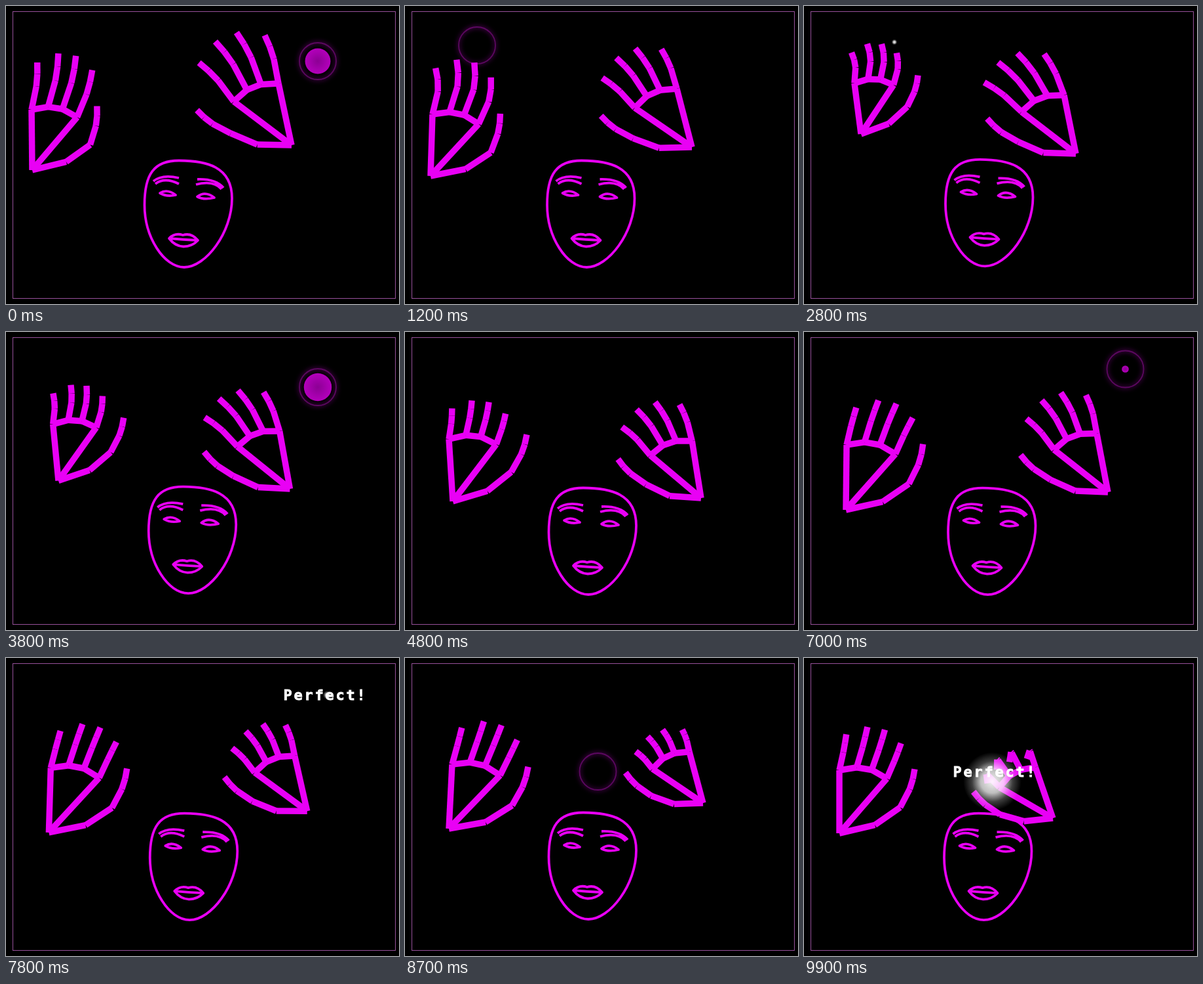
Write an HTML page with a canvas that moves like this. It is 600x454 px and loops after 10000 ms.

```html
<!DOCTYPE html>
<html lang="en">
<head>
<meta charset="utf-8">
<title>Hand rhythm game</title>
<style>
  html, body { margin: 0; width: 100%; height: 100%; overflow: hidden; background: #000; }
  canvas { display: block; }
</style>
</head>
<body>
<canvas id="stage" width="600" height="454"></canvas>
<script>
const ctx = document.getElementById('stage').getContext('2d');
const LOOP = 10000, STEP = 100;
const PINK = '#e900f5';
const TIMES = [0, 1200, 2800, 4800, 7000, 8700, 9900];

// Pose: wrist x, y, palm length, palm tilt, finger reach, finger lean (degrees, towards the thumb)
const left = {
  side: 1, splay: 11, thumbSize: 1,
  thumb: reach => 55 - .6 * reach,
  bend: lean => .1 - .008 * lean,
  poses: [
    [40, 250, 92, -.6, 74, 7.5],
    [39, 259, 94, 1.8, 72, 2],
    [87, 195, 78, -7.4, 48, 2],
    [73, 258, 95, -3.6, 48, 9.5],
    [64, 271, 99, .6, 60, 14],
    [67, 260, 98, 2.9, 59, 12],
    [54, 267, 96, 0, 57, 11]
  ]
};
const right = {
  side: -1, splay: 26, thumbSize: .94,
  thumb: reach => 24 + .25 * reach,
  bend: () => -.045,
  poses: [
    [436, 212, 96, 12, 78, 4],
    [438, 215, 92, 14.5, 66, 7],
    [415, 225, 91, 11.4, 71, 14.5],
    [452, 253, 88, 9, 60, 10],
    [464, 244, 91, 10.8, 62, 5],
    [455, 221, 81, 15, 36, 3],
    [380, 244, 82, 19, 26, 2]
  ]
};
const headShift = [[0, 0], [5.5, 0], [4.5, -1.6], [8, 2], [8.5, 2.2], [8, 0], [2.5, 1.2]];

const face = new Path2D(`
  M264 235.5 C305 235.5 345 244 345 293 C345 345 305 398 272 398
  C241 398 211.5 352 211.5 303 C211.5 256 226 235.5 264 235.5 Z
  M225 267 Q238 256 264 262 M228 271 Q242 260 264 271
  M292 264 Q320 263 332 277 M290 272 Q317 265 329 279
  M235 285 Q246 278 259 288 Q245 291 235 285 Z
  M292 290.5 Q304 281 318 292 Q302 296 292 290.5 Z
  M249 354 Q258 345 270 349 Q283 345 293 357 Q284 366.5 271 366.5 Q258 366 249 354 Z
  M249 354 Q270 356 293 357`);

// Circles to hit, one every GAP; dx, dy move the flash to the hand
const FIRST = -690, GAP = 1870, HIT = 980, FLASH_END = 1640;
const spot = (x, y, dx = 0, dy = 0) => ({ x, y, dx, dy });
const targets = [
  spot(476, 84), spot(110, 60, 28, -5), spot(476, 84),
  spot(110, 60), spot(490.5, 56.5), spot(294.5, 173, -7, 15)
];

const clamp = v => Math.max(0, Math.min(1, v));

function sample(poses, t) {
  let i = 0;
  while (i < TIMES.length - 2 && TIMES[i + 1] <= t) i++;
  const k = clamp((t - TIMES[i]) / (TIMES[i + 1] - TIMES[i]));
  return poses[i].map((v, j) => v + (poses[i + 1][j] - v) * k);
}

function disc(x, y, r, fill) {
  ctx.fillStyle = fill;
  ctx.beginPath();
  ctx.arc(x, y, r, 0, Math.PI * 2);
  ctx.fill();
}

function bones(points) {
  for (let i = 1; i < points.length; i++) {
    ctx.beginPath();
    ctx.moveTo(...points[i - 1]);
    ctx.lineTo(...points[i]);
    ctx.stroke();
  }
}

// Joints from a to b, bowed sideways; curl folds the tip back
function finger([ax, ay], [bx, by], bend, curl) {
  const dx = bx - ax, dy = by - ay;
  const at = (along, off) => [ax + dx * along - dy * off, ay + dy * along + dx * off];
  bones([
    [ax, ay],
    at(.5 + .5 * curl, bend),
    at(.76 + .3 * curl, bend * .75),
    at(1 - .35 * curl, -.3 * curl)
  ]);
}

function drawHand(hand, t) {
  const [x, y, size, tilt, reach, lean] = sample(hand.poses, t);
  const { side, splay, thumbSize } = hand;
  const polar = ([px, py], r, deg) => {
    const a = deg * Math.PI / 180;
    return [px + side * r * Math.sin(a), py - r * Math.cos(a)];
  };
  const wrist = [x, y];
  const bend = side * hand.bend(lean);
  const curl = clamp((35 - reach) / 9);

  // Spread from little finger (0) to index (1)
  const spread = [1, .66, .36, 0], ratio = [1.02, 1.13, 1.12, .98];
  const base = spread.map(s =>
    polar(wrist, size * (1 + .15 * Math.sin(s * Math.PI / 2)), tilt + 41 * s));
  const thumb1 = polar(wrist, size * .58 * thumbSize, tilt + 77);
  const thumb2 = polar(wrist, size * 1.05 * thumbSize, tilt + 67);
  const thumbTip = polar(thumb2, size * .65, tilt + hand.thumb(reach));

  ctx.strokeStyle = PINK;
  ctx.lineWidth = 9.5;
  bones([wrist, thumb1, thumb2]);
  finger(thumb2, thumbTip, side * .06, 0);
  bones([wrist, ...base, wrist]);
  base.forEach((b, i) => {
    const tip = polar(b, reach * ratio[i], tilt + lean + splay * spread[i]);
    finger(b, tip, bend, curl);
  });
}

function drawHead(t) {
  ctx.save();
  ctx.translate(...sample(headShift, t));
  ctx.strokeStyle = PINK;
  ctx.lineWidth = 3.8;
  ctx.lineJoin = 'round';
  ctx.stroke(face);
  ctx.restore();
}

function drawTarget({ x, y }, age) {
  ctx.save();
  ctx.strokeStyle = '#5c0860';
  ctx.lineWidth = 1.8;
  ctx.shadowColor = '#90009a';
  ctx.shadowBlur = 7;
  ctx.beginPath();
  ctx.arc(x, y, 28, 0, Math.PI * 2);
  ctx.stroke();
  ctx.restore();
  const r = Math.min(28, (age - 30) * .0295);
  if (r < 1) return;
  const g = ctx.createRadialGradient(x, y, 0, x, y, r);
  g.addColorStop(0, '#8c0094');
  g.addColorStop(1, '#b400bc');
  disc(x, y, r, g);
}

function drawFlash({ x, y, dx, dy }, age) {
  const r = 47 * Math.sin(Math.PI * (age - HIT) / (FLASH_END - HIT));
  if (r > .5) {
    const cx = x + dx, cy = y + dy;
    const g = ctx.createRadialGradient(cx, cy, 0, cx, cy, r);
    g.addColorStop(0, 'rgba(255,255,255,.95)');
    g.addColorStop(.4, 'rgba(255,255,255,.75)');
    g.addColorStop(.7, 'rgba(255,255,255,.24)');
    g.addColorStop(1, 'rgba(255,255,255,0)');
    disc(cx, cy, r, g);
  }
  if (age < 1520) {
    ctx.font = 'bold 22px "DejaVu Sans Mono", "Liberation Mono", monospace';
    ctx.letterSpacing = '2.75px';
    ctx.fillStyle = ctx.strokeStyle = '#fff';
    ctx.lineWidth = .8;
    ctx.fillText('Perfect!', x - 67, y + 7.5);
    ctx.strokeText('Perfect!', x - 67, y + 7.5);
  }
}

function draw(t) {
  ctx.fillStyle = '#000';
  ctx.fillRect(0, 0, 600, 454);
  ctx.strokeStyle = '#96509a';
  ctx.lineWidth = 1;
  ctx.strokeRect(10.5, 8.5, 584, 437);

  const live = targets.map((c, i) => ({ c, age: t - FIRST - i * GAP }));
  live.forEach(({ c, age }) => { if (age >= 0 && age < HIT) drawTarget(c, age); });
  drawHead(t);
  drawHand(left, t);
  drawHand(right, t);
  live.forEach(({ c, age }) => { if (age >= HIT && age < FLASH_END) drawFlash(c, age); });
}

const start = performance.now();
function tick() {
  const t = Math.max(0, performance.now() - start) % LOOP;
  draw(Math.floor(t / STEP) * STEP);
  requestAnimationFrame(tick);
}
tick();
</script>
</body>
</html>
```
